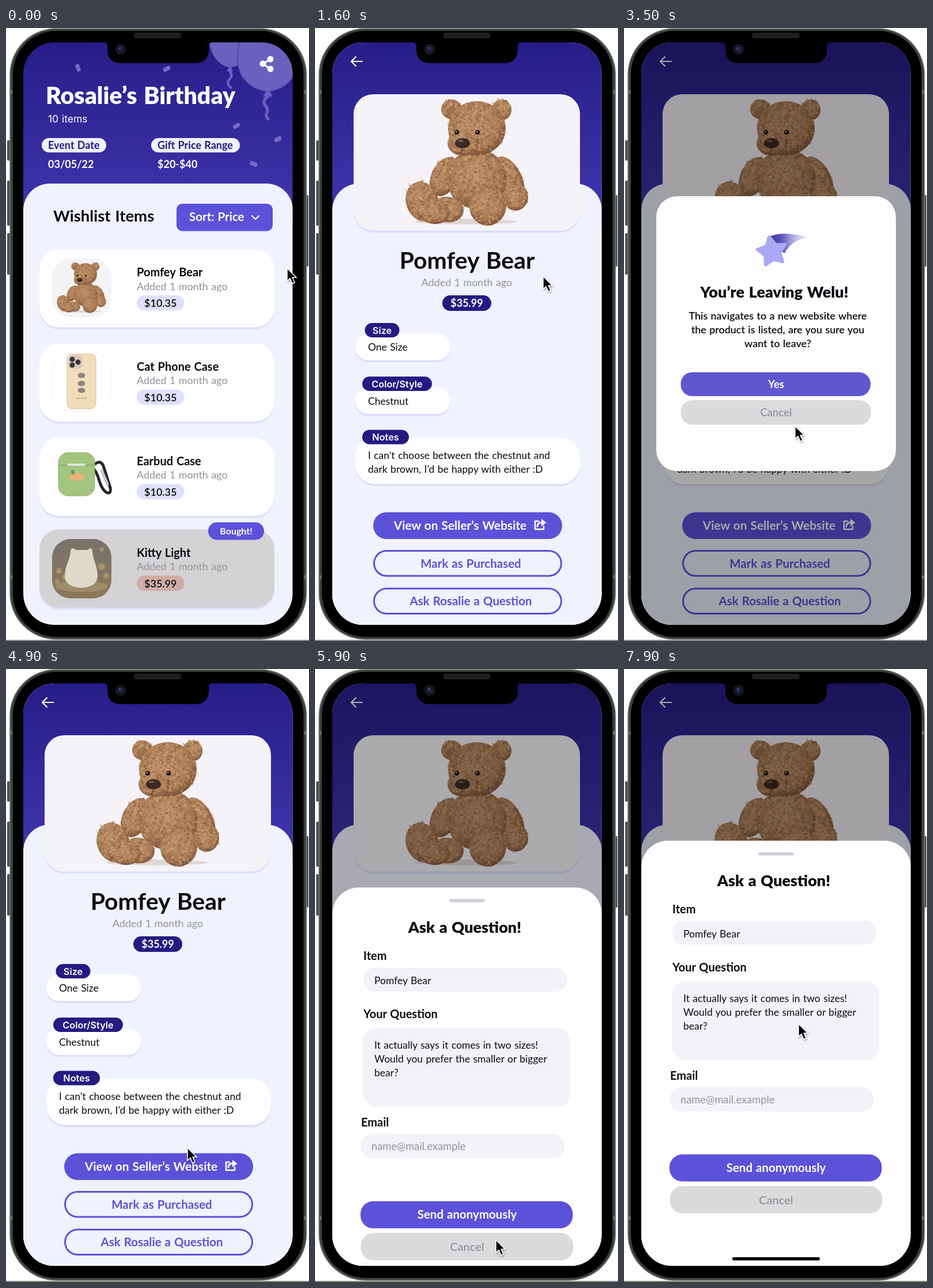
Recreate the animation shown at these times as an HTML page. Size 526x1064 px, loop 8000 ms.

```html
<!DOCTYPE html>
<html lang="en">
<head>
<meta charset="utf-8">
<title>Wishlist prototype</title>
<style>
  html, body { margin: 0; width: 100%; height: 100%; overflow: hidden; background: #fefefe; }
  svg { display: block; width: 100vw; height: 100vh; }
  text { font-family: Lato, "Open Sans", sans-serif; word-spacing: .05em; white-space: pre; }
  .label { font-family: Inter, sans-serif; }
</style>
</head>
<body>
<svg id="stage" viewBox="0 0 526 1064" xmlns="http://www.w3.org/2000/svg"></svg>
<script>
const NAVY = '#241a82', VIOLET = '#5c51d9', PANEL = '#f0f2ff', PAPER = '#fefdff',
      GREY = '#949299', FIELD = '#f3f2f6', SHADE = '#dcdffb';
const LOOP = 8000, BODY = 17.5;

// ---------- drawing helpers ----------
const rect = (x, y, w, h, r, fill, extra = '') =>
  `<rect x="${x}" y="${y}" width="${w}" height="${h}" rx="${r}" fill="${fill}" ${extra}/>`;
const oval = (x, y, rx, ry, fill, extra = '') =>
  `<ellipse cx="${x}" cy="${y}" rx="${rx}" ry="${ry}" fill="${fill}" ${extra}/>`;
const line = (d, color, width, extra = '') =>
  `<path d="${d}" fill="none" stroke="${color}" stroke-width="${width}" stroke-linecap="round" stroke-linejoin="round" ${extra}/>`;
const text = (x, y, size, weight, str, fill = '#0b0a10', extra = '') =>
  `<text x="${x}" y="${y}" font-size="${size}" font-weight="${weight}" fill="${fill}" ${extra}>${str}</text>`;
const centered = (x, y, size, weight, str, fill, extra = '') =>
  text(x, y, size, weight, str, fill, 'text-anchor="middle" ' + extra);
const card = (x, y, w, h, r, fill = PAPER) =>
  rect(x, y + 3.5, w, h, r, SHADE) + rect(x, y, w, h, r, fill);
const group = (id, body, extra = '') => `<g id="${id}" ${extra}>${body}</g>`;

let seed = 7;
const random = () => (seed = seed * 16807 % 2147483647) / 2147483647;

// ---------- bear ----------
function curls(cx, cy, rx, ry, count) {
  let d = '';
  for (let i = 0; i < count; i++) {
    const a = random() * 6.283, k = Math.sqrt(random());
    const x = cx + Math.cos(a) * rx * k, y = cy + Math.sin(a) * ry * k;
    const dx = random() * 8 - 4, dy = random() * 8 - 4;
    d += `M${x.toFixed(1)} ${y.toFixed(1)}q${dy.toFixed(1)} ${(-dx).toFixed(1)} ${dx.toFixed(1)} ${dy.toFixed(1)}`;
  }
  return d;
}
function furry(x, y, rx, ry, angle = 0) {
  const n = Math.round(rx * ry / 14);
  return `<g transform="rotate(${angle} ${x} ${y})">` + oval(x, y, rx, ry, 'url(#fur)') +
    line(curls(x, y, rx, ry, n), '#74492f', 1.5, 'opacity=".5"') +
    line(curls(x, y, rx, ry, n), '#d6ad86', 1.5, 'opacity=".6"') + '</g>';
}
const bear =
  oval(262, 336, 88, 5, '#cfc5c2', 'opacity=".6"') +
  furry(237, 141, 18, 17) + furry(324, 142, 17, 18) + oval(238, 145, 9, 9, '#855a3c', 'opacity=".5"') +
  furry(225, 258, 23, 36, 25) + furry(337, 262, 22, 42, -26) +
  furry(281, 262, 52, 52) + furry(230, 315, 28, 22, 10) + furry(348, 293, 22, 24) +
  furry(281, 174, 50, 47) + furry(257, 200, 27, 22) +
  furry(186, 301, 28, 35, -18) + furry(206, 318, 28, 22, 12) + furry(300, 309, 32, 34, 10) +
  oval(256, 200, 13, 9, '#3a2925') + oval(253, 196, 5, 2, '#6b5750') +
  line('M256 209q-1 7 -5 9', '#68452c', 2) +
  [246, 282].map(x => oval(x, 181, 4, 4, '#211a18') + oval(x - 1, 180, 1, 1, '#fff')).join('');

// ---------- wishlist ----------
const confetti = [[125, 69, 72], [279, 71, -28], [400, 170, -30], [472, 193, -28], [430, 236, 22]]
  .map(([x, y, a]) => rect(x - 6.5, y - 3.5, 13, 7, 2.5, '#766cc8', `transform="rotate(${a} ${x} ${y})"`)).join('');

const balloons = `<g fill="#6a60bd">` +
  `<path d="M353 20C353 48 372 66 387 68L383 75H394L391 68C412 65 430 48 430 20Z"/>` +
  line('M388 75q7 7 0 14t3 15', '#6a60bd', 4) +
  `<path d="M402 55C402 88 428 107 451 110L446 119H463L458 110C482 107 506 88 506 55V20H406Q402 38 402 55Z" stroke="#4a3fa8" stroke-width="1.5"/>` +
  line('M454 119q-10 8 -4 15t3 13t2 11', '#6a60bd', 5) + '</g>';

const share = line('M459 54L446 62L459 71', '#fff', 3) +
  [[459, 54], [446, 62], [459, 71]].map(([x, y]) => oval(x, y, 5.5, 5.5, '#fff')).join('');

function headerFact(x, w, label, value) {
  return rect(x, 191, w, 25, 12.5, PANEL) +
    text(x + 11, 210, 18, 700, label, NAVY) + text(x + 11, 243, 18, 700, value, '#fff');
}
function item(y, name, price, photo, sold) {
  return card(58, y, 408, 135.5, 34, sold ? '#d4d2d4' : PAPER) + photo +
    text(227, y + 47, 20, 700, name) + text(227, y + 70.5, 17.9, 400, 'Added 1 month ago', GREY) +
    rect(227, y + 80, 82.5, 26.5, 13, sold ? '#cfaca6' : '#dfe1fb') + text(240, y + 100, 18, 600, price);
}

const bearThumb = rect(80, 400, 103, 102, 32, '#f4f3f5') +
  `<use href="#bear" transform="translate(25.6 357.4) scale(.4)"/>`;

const phoneCase = rect(80, 563, 103, 102, 34, PAPER, 'stroke="#f5f2f6"') +
  rect(106, 566, 50, 95, 9, '#f1ddb9', 'stroke="#d9c09a"') + rect(108.5, 568.5, 24, 23, 7, '#d5c8ba') +
  [[115, 575], [115, 585], [125, 580]].map(([x, y]) => oval(x, y, 4.5, 4.5, '#38343a')).join('') +
  [603, 617, 629].map(y => oval(131, y, 6.5, 4.5, '#8b8581')).join('') +
  centered(131, 643.5, 4, 700, 'L I T T L E', '#6b6259');

const budsCase =
  line('M154 757q10 -8 15 3l12 38q2 12 -7 8q-8 -6 -12 -20t-9 -20', '#26272a', 5) +
  line('M166 768L176 792', '#c5c8cf', 5) +
  rect(91, 737, 63, 75, 17, '#a2c57f', 'stroke="#8cae6b"') + line('M92 759H153', '#82a262', 1.5) +
  rect(106, 756, 32, 4, 2, '#dfe5dc') + oval(123, 779, 13, 7, '#eeb176') + oval(116, 771, 3, 4, '#5f9c68');

const lamp = rect(80, 887, 103, 103, 32, 'url(#dusk)') +
  [[92, 942, 5], [101, 953, 4], [166, 935, 6], [174, 951, 5], [89, 961, 4], [166, 905, 4]]
    .map(([x, y, r]) => oval(x, y, r, r, '#c9a968', 'opacity=".55"')).join('') +
  oval(131, 969, 45, 10, '#b5a17b', 'opacity=".5"') +
  '<path d="M112 909Q113 899 121 906H142Q149 899 150 909C151 923 159 934 159 952C159 978 102 978 102 952C102 934 111 923 112 909Z" fill="#dfd9cb"/>';

const list = rect(30, 24, 468, 320, 0, 'url(#sky)') + confetti + balloons + share +
  text(69, 132, 41, 900, 'Rosalie’s Birthday', '#fff') +
  text(73, 164, 17.5, 400, '10 items', '#fff', 'class="label"') +
  headerFact(62, 112, 'Event Date', '03/05/22') + headerFact(252, 154, 'Gift Price Range', '$20-$40') +
  rect(30, 270, 468, 800, 46, PANEL) + text(82, 336, 27.5, 700, 'Wishlist Items') +
  rect(296, 305, 167, 47.5, 10, VIOLET) + text(318, 335, 20.5, 700, 'Sort: Price', '#fff') +
  line('M427 326L433 332L439 326', '#fff', 2.2) +
  item(384, 'Pomfey Bear', '$10.35', bearThumb) +
  item(547.5, 'Cat Phone Case', '$10.35', phoneCase) +
  item(711.5, 'Earbud Case', '$10.35', budsCase) +
  item(870.5, 'Kitty Light', '$35.99', lamp, true) +
  rect(351, 858, 97, 30.5, 15, VIOLET) + centered(399.5, 878.5, 16, 700, 'Bought!', '#fff');

// ---------- item detail ----------
function note({ box: [y, w, h], tag: [tagX, tagY, tagW], label, textY, lines }) {
  return card(69.5, y, w, h, Math.min(h / 2, 34)) +
    lines.map((s, i) => text(92, textY + 24 * i, BODY, 400, s)).join('') +
    rect(tagX, tagY, tagW, 25, 12.5, NAVY) +
    centered(tagX + tagW / 2, tagY + 18.5, 16.3, 600, label, '#fff', 'class="label"');
}
const outlineButton = (y, label) =>
  rect(102.5, y, 325, 43.5, 21.7, PANEL, `stroke="${VIOLET}" stroke-width="3"`) +
  centered(270.5, y + 29, 20.5, 700, label, VIOLET);

const detail = rect(30, 24, 468, 1012, 24, PANEL) + rect(30, 24, 468, 320, 0, 'url(#sky)') +
  rect(30, 270, 468, 766, 46, PANEL) + rect(30, 960, 468, 76, 24, PANEL) +
  line('M82 58H63M71 50L63 58L71 66', '#fff', 2.2) +
  card(67, 115, 393, 236.5, 34, '#f5f3f7') + '<use href="#bear"/>' +
  centered(264, 418, 41, 700, 'Pomfey Bear') +
  centered(263.5, 448, 17.9, 400, 'Added 1 month ago', GREY) +
  rect(221, 464, 85, 27, 13.5, NAVY) + centered(263.5, 484, 18, 700, '$35.99', '#fff') +
  note({ box: [530, 165.5, 46.5], tag: [86.5, 512, 60], label: 'Size', textY: 560, lines: ['One Size'] }) +
  note({ box: [623.5, 165.5, 46.5], tag: [82, 605, 121], label: 'Color/Style', textY: 654, lines: ['Chestnut'] }) +
  note({ box: [711, 390.5, 80.5], tag: [82, 697.5, 81], label: 'Notes', textY: 748,
    lines: ['I can’t choose between the chestnut and', 'dark brown, I’d be happy with either :D'] }) +
  rect(101, 840.5, 328, 46.5, 23, VIOLET) +
  centered(252, 871, 20.8, 700, 'View on Seller’s Website', '#fff') +
  line('M388 856H382V870H397V865', '#fff', 2.6) + line('M386 865q0 -7 9 -7', '#fff', 3) +
  '<path d="M393 852L401.5 858.5L393 865Z" fill="#fff"/>' +
  outlineButton(907.5, 'Mark as Purchased') + outlineButton(973, 'Ask Rosalie a Question');

// ---------- leave dialog ----------
const starPoints = Array.from({ length: 10 }, (_, i) => {
  const a = i * Math.PI / 5 - 1.75, r = i % 2 ? 14 : 26;
  return `${257 + r * Math.cos(a)},${388 + r * Math.sin(a)}`;
}).join(' ');
const dialog = rect(56, 292, 416, 477, 36, PAPER) +
  '<path d="M248 364Q275 350 322 364Q292 366 279 391L262 382Z" fill="url(#trail)"/>' +
  `<polygon points="${starPoints}" fill="#aaa9f6" stroke="#aaa9f6" stroke-width="5" stroke-linejoin="round"/>` +
  centered(261, 468, 27, 900, 'You’re Leaving Welu!') +
  ['This navigates to a new website where', 'the product is listed, are you sure you', 'want to leave?']
    .map((s, i) => centered(267, 506 + 24 * i, 17.9, 600, s)).join('') +
  rect(98.5, 597.5, 329.5, 41.5, 20, '#6057d0') + centered(264, 625, 18.5, 700, 'Yes', '#fff') +
  rect(98.5, 646, 330.5, 42.5, 20, '#dcdadd') + centered(264, 674, 18.5, 600, 'Cancel', GREY);

// ---------- question sheet ----------
const sheet = rect(30, 298, 468, 800, 46, PAPER) + rect(233, 318, 62, 5.5, 2.7, '#d0ced6') +
  centered(260, 377, 27, 900, 'Ask a Question!') +
  text(84, 424, 20, 700, 'Item') + rect(84, 437, 354, 41.5, 20, FIELD) + text(103, 466, BODY, 400, 'Pomfey Bear') +
  text(84, 525, 20, 700, 'Your Question') + rect(84, 542, 359, 136.5, 22, FIELD) +
  ['It actually says it comes in two sizes!', 'Would you prefer the smaller or bigger', 'bear?']
    .map((s, i) => text(103, 578 + 24 * i, BODY, 400, s)).join('') +
  text(80, 713, 20, 700, 'Email') + rect(79.5, 726, 354, 42, 20, FIELD) +
  text(98, 754, 18.3, 400, 'name@mail.example', GREY) +
  rect(79, 842.5, 368.5, 47, 22, VIOLET) + centered(264, 873, 20.5, 700, 'Send anonymously', '#fff') +
  rect(79.5, 897.5, 369, 47.5, 22, '#dcdadd') + centered(264, 929, 20, 600, 'Cancel', GREY) +
  rect(188, 1021, 152, 5.5, 2.7, '#000');

// ---------- phone ----------
const sideButton = (x, y, h) => rect(x, y, 5, h, 1.5, '#4b524f');
const phone = rect(0, 1062, 526, 2, 0, '#8b8b8b') +
  sideButton(2, 195, 35) + sideButton(2, 265, 78) + sideButton(2, 356, 72) + sideButton(520, 290, 124) +
  rect(7, 1, 514.5, 1060, 80, '#3a403e', 'stroke="#757b78" stroke-width="1.5"') +
  rect(12, 5, 504.5, 1052, 75, '#000') +
  [108, 950].map(y => rect(6.5, y, 4.5, 6, 0, '#6c716f') + rect(517.5, y, 4.5, 6, 0, '#6c716f')).join('') +
  rect(223, 9, 81, 8, 3, '#1d1d1f', 'stroke="#2c2c2e"');
const notch = '<path d="M170 22H358V25Q352 25 352 32V37Q352 61 328 61H200Q176 61 176 37V32Q176 25 170 25Z"/>' +
  oval(199, 37, 9.5, 9.5, '#15161f') + oval(199, 37, 5, 5, '#1d2148') + oval(197.5, 35, 1.8, 1.8, '#4b4f86');
const arrow = '<path d="M0 0V22L5 17.5L9 26.5L13 24.8L9.2 16H16Z" fill="#000" stroke="#fff" stroke-width="1.5"/>';

const stage = document.getElementById('stage');
stage.innerHTML = `<defs>
  <linearGradient id="sky" gradientUnits="userSpaceOnUse" x1="0" y1="25" x2="0" y2="290">
    <stop stop-color="#271d88"/><stop offset="1" stop-color="#3d32a9"/></linearGradient>
  <linearGradient id="trail"><stop stop-color="#31279a"/><stop offset=".35" stop-color="#5d54b8"/>
    <stop offset="1" stop-color="#d9d7f8" stop-opacity=".3"/></linearGradient>
  <linearGradient id="dusk" x2="0" y2="1"><stop stop-color="#77726b"/><stop offset="1" stop-color="#8b7858"/></linearGradient>
  <radialGradient id="fur" cx=".45" cy=".4" r=".62"><stop stop-color="#bd9067"/>
    <stop offset=".7" stop-color="#ab7c55"/><stop offset="1" stop-color="#7d5338"/></radialGradient>
  <clipPath id="glass">${rect(30, 25, 467.5, 1011, 54, '#000')}</clipPath>
  ${group('bear', bear)}
  <filter id="drop" x="-50%" y="-50%" width="200%" height="200%">
    <feDropShadow dx="1" dy="2" stdDeviation="1.5" flood-opacity=".35"/></filter></defs>` +
  phone +
  `<g clip-path="url(#glass)">` +
    group('list', list) + rect(30, 24, 468, 1013, 0, '#000', 'id="listShade"') +
    group('detail', detail) + rect(30, 24, 468, 1013, 0, '#000', 'id="detailShade"') +
    group('dialog', dialog) + group('sheet', sheet) +
  '</g>' + notch + group('cursor', arrow, 'filter="url(#drop)"');

// ---------- motion ----------
const part = Object.fromEntries(['list', 'listShade', 'detail', 'detailShade', 'dialog', 'sheet', 'cursor']
  .map(id => [id, document.getElementById(id)]));
const cursorPath = [
  [0, 488, 417], [100, 500, 420], [500, 396, 431], [1700, 396, 431], [2400, 300, 862], [2900, 300, 862],
  [3500, 297, 691], [3800, 292, 668], [4300, 292, 668], [4900, 315, 831], [5400, 314, 991],
  [6350, 314, 991], [7200, 310, 841], [7900, 303, 616], [LOOP, 303, 616]];

const ramp = (t, start, length) => Math.min(1, Math.max(0, (t - start) / length));
const easeOut = k => 1 - (1 - k) ** 1.7;
const move = (el, x, y) => el.setAttribute('transform', `translate(${x.toFixed(2)} ${y.toFixed(2)})`);
const fade = (el, a) => {
  el.setAttribute('opacity', a.toFixed(3));
  el.setAttribute('visibility', a > 0 ? 'visible' : 'hidden');
};

function cursorAt(t) {
  const i = cursorPath.findIndex(p => p[0] > t);
  const [t0, x0, y0] = cursorPath[i - 1], [t1, x1, y1] = cursorPath[i];
  const k = (t - t0) / (t1 - t0), s = k * k * (3 - 2 * k);
  return [x0 + (x1 - x0) * s, y0 + (y1 - y0) * s];
}

function draw(t) {
  const push = easeOut(ramp(t, 671, 300));
  const asking = easeOut(ramp(t, 5683, 300));
  const leaving = easeOut(ramp(t, 2550, 250)) - easeOut(ramp(t, 4050, 250));
  move(part.list, -117 * push, 0);
  fade(part.listShade, .5 * push);
  move(part.detail, 468 * (1 - push), 0);
  fade(part.detailShade, .34 * Math.max(leaving, asking));
  fade(part.dialog, leaving);
  move(part.sheet, 0, 738 * (1 - asking));
  fade(part.sheet, asking > 0 ? 1 : 0);
  move(part.cursor, ...cursorAt(t));
}

const begin = performance.now();
function tick() {
  draw((performance.now() - begin) % LOOP);
  requestAnimationFrame(tick);
}
tick();
</script>
</body>
</html>
```
